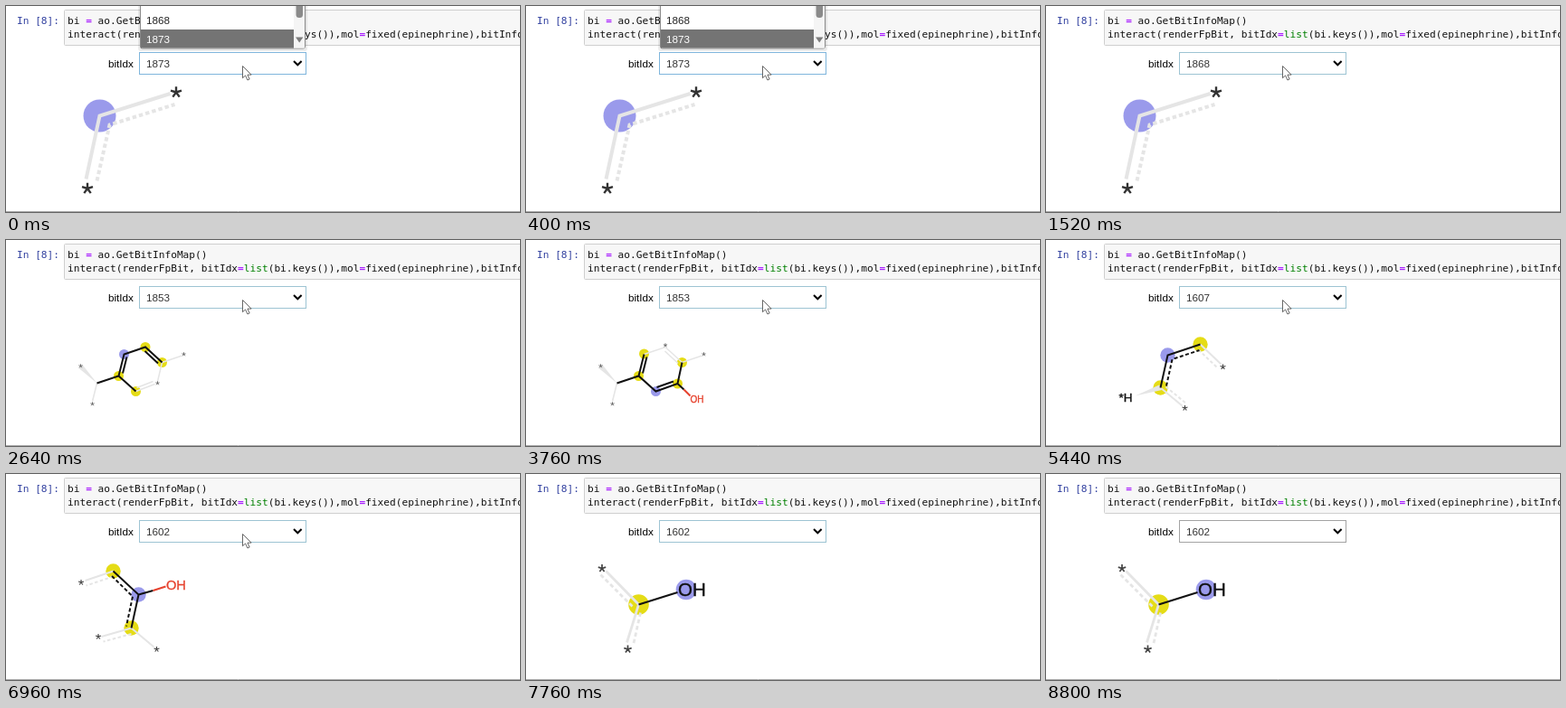
An HTML page for the animation above (8.88 s loop, 568x228 px).

```html
<!DOCTYPE html>
<html lang="en">
<head>
<meta charset="utf-8">
<title>Fingerprint bit browser</title>
<style>
  html, body { margin: 0; width: 100%; height: 100%; overflow: hidden; background: #fff; }
  svg { display: block; width: 568px; height: 228px; }
  .code { font: 11.16px "DejaVu Sans Mono", monospace; white-space: pre; }
  .ui, .atom { font: 11.7px "Liberation Sans", Arial, sans-serif; }
  .op { fill: #a2f; font-weight: bold; }
  .builtin { fill: #008000; }
</style>
</head>
<body>
<svg viewBox="0 0 568 228">
  <rect x="64.5" y="4.5" width="520" height="39" rx="1" fill="#f7f7f7" stroke="#cfcfcf"/>
  <g class="code" fill="#111">
    <text x="12" y="20" fill="#303f9f">In [8]:</text>
    <text x="68" y="20">bi <tspan class="op">=</tspan> ao.GetBitInfoMap()</text>
    <text x="68" y="35">interact(renderFpBit, bitIdx<tspan class="op">=</tspan><tspan class="builtin">list</tspan>(bi.keys()),mol<tspan class="op">=</tspan>fixed(epinephrine),bitInfo</text>
  </g>
  <path d="M0 227.5H568" stroke="#ababab"/>

  <g class="ui" fill="#333">
    <text x="113" y="68" fill="#000">bitIdx</text>
    <rect id="field" x="147.5" y="51.5" width="184" height="24" fill="#fff"/>
    <text id="value" x="155" y="68"></text>
    <path d="M318 61l4.3 4.3 4.3-4.3" fill="none" stroke="#000" stroke-width="2"/>
  </g>

  <g id="molecules" transform="translate(.5 .5)"></g>

  <g id="list" class="ui">
    <rect x="146" y="-10" width="187" height="60" rx="3" fill="#000" opacity=".08"/>
    <rect x="148.5" y="-10" width="182" height="57" rx="2" fill="#fff" stroke="#8a8a8a"/>
    <rect x="149" y="26" width="169" height="20.5" fill="#747474"/>
    <text x="155" y="20" fill="#222">1868</text>
    <text x="155" y="41" fill="#fff">1873</text>
    <rect x="318" y="-5" width="12" height="51.5" fill="#f5f5f5"/>
    <rect x="320.5" y="-10" width="7.5" height="23" rx="3.5" fill="#8b8b8b"/>
    <path d="M320 34.5h8.4l-4.2 6z" fill="#7d7d7d"/>
  </g>

  <path id="cursor" d="M0 0V13.2L3.1 10.4 5.4 15.5 7.6 14.5 5.4 9.6H9.6Z" fill="#fff" stroke="#555" stroke-width=".9" stroke-linejoin="round"/>
</svg>

<script>
const LOOP = 8880, STEP = 80;
const BLUE = "#9a9aeb", YELLOW = "#e5dc16", RED = "#e6422e", LIGHT = "#e5e5e5", BLACK = "#111";
const $ = id => document.getElementById(id);

const halo = (color, r, ...centres) =>
  centres.map(([x, y]) => `<circle cx="${x}" cy="${y}" r="${r}" fill="${color}"/>`).join("");
const bond = (color, width, d, dash = "none") =>
  `<path d="${d}" fill="none" stroke="${color}" stroke-width="${width}" stroke-dasharray="${dash}"/>`;
const wedge = d => `<path d="${d}z" fill="${LIGHT}"/>`;
const label = (text, x, y, size, color = BLACK) =>
  `<text class="atom" x="${x}" y="${y}" fill="${color}" stroke="${color}" stroke-width=".35" style="font-size:${size}px">${text}</text>`;
const stars = (r, color, ...centres) => centres.map(([x, y]) => {
  let d = "";
  for (let i = 0; i < 5; i++) {
    const a = (i * 0.4 - 0.5) * Math.PI;
    d += `M${x} ${y}l${r * Math.cos(a)} ${r * Math.sin(a)}`;
  }
  return bond(color, r * 0.38, d);
}).join("");

// Parts shared by the two six-ring fragments
const ringTail = wedge("M100 158L79.5 141 84 137.5") + bond(LIGHT, 1.5, "M100 158L95 178");
const ringStars = [[82, 139], [95, 181], [196, 126]];

const drawings = [
  halo(BLUE, 18, [103, 121]) +
  bond(LIGHT, 4, "M88 191L103 121 181 96.5") +
  bond(LIGHT, 4, "M100 193L114 131 186 108.5", "4.5 3") +
  stars(6.3, "#333", [187.5, 95], [89.5, 201.5]),

  halo(YELLOW, 5.5, [153.5, 118], [172, 135], [124, 150], [143, 167]) + halo(BLUE, 5.5, [130, 126]) +
  ringTail +
  bond(LIGHT, 1.5, "M172 135L194 127.5M172 135L167 156M143 167L164 159M144 163L162 156") +
  bond(BLACK, 2, "M100 158L124 150 130 126 153.5 118 172 135M124 150L143 167M128.5 147L133 129M153 122.5L167.5 136") +
  stars(2.2, "#555", ...ringStars, [167, 158]),

  halo(YELLOW, 5.5, [130, 125.5], [124, 150], [172, 135], [167, 158.5]) + halo(BLUE, 5.5, [143, 167]) +
  ringTail +
  bond(LIGHT, 1.5, "M130 126L153.5 118 172 135 194 127.5M153 122.5L167.5 136") +
  bond(BLACK, 2, "M100 158L124 150 143 167 167 158.5 172 135M124 150L130 126M128.5 147L133 129M144 162.5L162.5 156M167 158.5L174 165") +
  bond(RED, 2, "M174 165L181 172") +
  label("OH", 181, 179.5, 10, RED) +
  stars(2.2, "#555", ...ringStars, [153.5, 116]),

  halo(YELLOW, 8.2, [170, 115], [126, 163]) + halo(BLUE, 8.2, [134, 127]) +
  wedge("M98 172L124.5 160 127.5 165.5") +
  bond(LIGHT, 2, "M170 115L193 137M126 163L150 183") +
  bond(LIGHT, 2, "M168 121L189 141M132 162L154 180", "3.5 2.5") +
  bond(BLACK, 2, "M126 163L134 127 170 115") +
  bond(BLACK, 2, "M132.5 161L139 131.5 169 121.5", "4 2.5") +
  label("*H", 80, 178.5, 13.5) +
  stars(3.1, "#444", [195, 140], [153, 185.5]),

  halo(YELLOW, 8.2, [118, 107], [138, 170]) + halo(BLUE, 8.2, [146, 133]) +
  bond(LIGHT, 2, "M118 107L87 117.5M138 170L105 179.5M138 170L163 191") +
  bond(LIGHT, 2, "M118 113L88 123M138 176.5L107 185", "3.5 2.5") +
  bond(BLACK, 2, "M118 107L146 133 138 170M146 133L162 128.5") +
  bond(BLACK, 2, "M116.5 112.5L139.5 135 132.5 168", "4 2.5") +
  bond(RED, 2, "M162 128.5L176 124") +
  label("OH", 176.5, 127.5, 14.6, RED) +
  stars(3.1, "#444", [82.5, 119.5], [101.5, 179.5], [166, 193.5]),

  halo(YELLOW, 11.3, [124, 144]) + halo(BLUE, 11.3, [176.5, 127.5]) +
  bond(LIGHT, 2.8, "M88 107L124 144 111 186") +
  bond(LIGHT, 2.8, "M82 111L118 147M126 153L118 189", "4.5 3") +
  bond(BLACK, 2.2, "M124 144L167 130.5") +
  label("OH", 167.5, 134.5, 20.5) +
  stars(4.4, "#444", [83.5, 104], [112, 193.5])
];

// Each chosen value is rendered a little after the field shows it
const values = [[0, "1873"], [1280, "1868"], [2480, "1853"], [4400, "1750"], [5360, "1607"], [6720, "1602"]];
const renders = [0, 1760, 2960, 4880, 5920, 7200].map((start, i) => [start, i]);
const borders = [[0, "#7fb5dc"], [480, "#9dc4d3"], [8000, "#a3a3a3"]];
const LIST_CLOSES = 480, CURSOR_LEAVES = 7280, CURSOR_GONE = 7600;

const current = (schedule, t) => schedule.filter(([start]) => start <= t).pop()[1];

$("molecules").innerHTML = drawings.map(d => `<g>${d}</g>`).join("");
const groups = [...$("molecules").children];

function draw(now) {
  const t = Math.floor((now % LOOP) / STEP) * STEP;
  const shown = current(renders, t);
  groups.forEach((g, i) => g.style.display = i === shown ? "" : "none");
  $("value").textContent = current(values, t);
  $("field").setAttribute("stroke", current(borders, t));
  $("list").style.display = t < LIST_CLOSES ? "" : "none";

  const p = Math.min(1, Math.max(0, (t - CURSOR_LEAVES) / (CURSOR_GONE - CURSOR_LEAVES)));
  const ease = p * p * (3 - 2 * p);
  $("cursor").setAttribute("transform", `translate(${261.5 + 22 * ease} ${66.5 - 90 * ease})`);
}

const begin = performance.now();
(function tick() {
  draw(performance.now() - begin);
  requestAnimationFrame(tick);
})();
</script>
</body>
</html>
```
